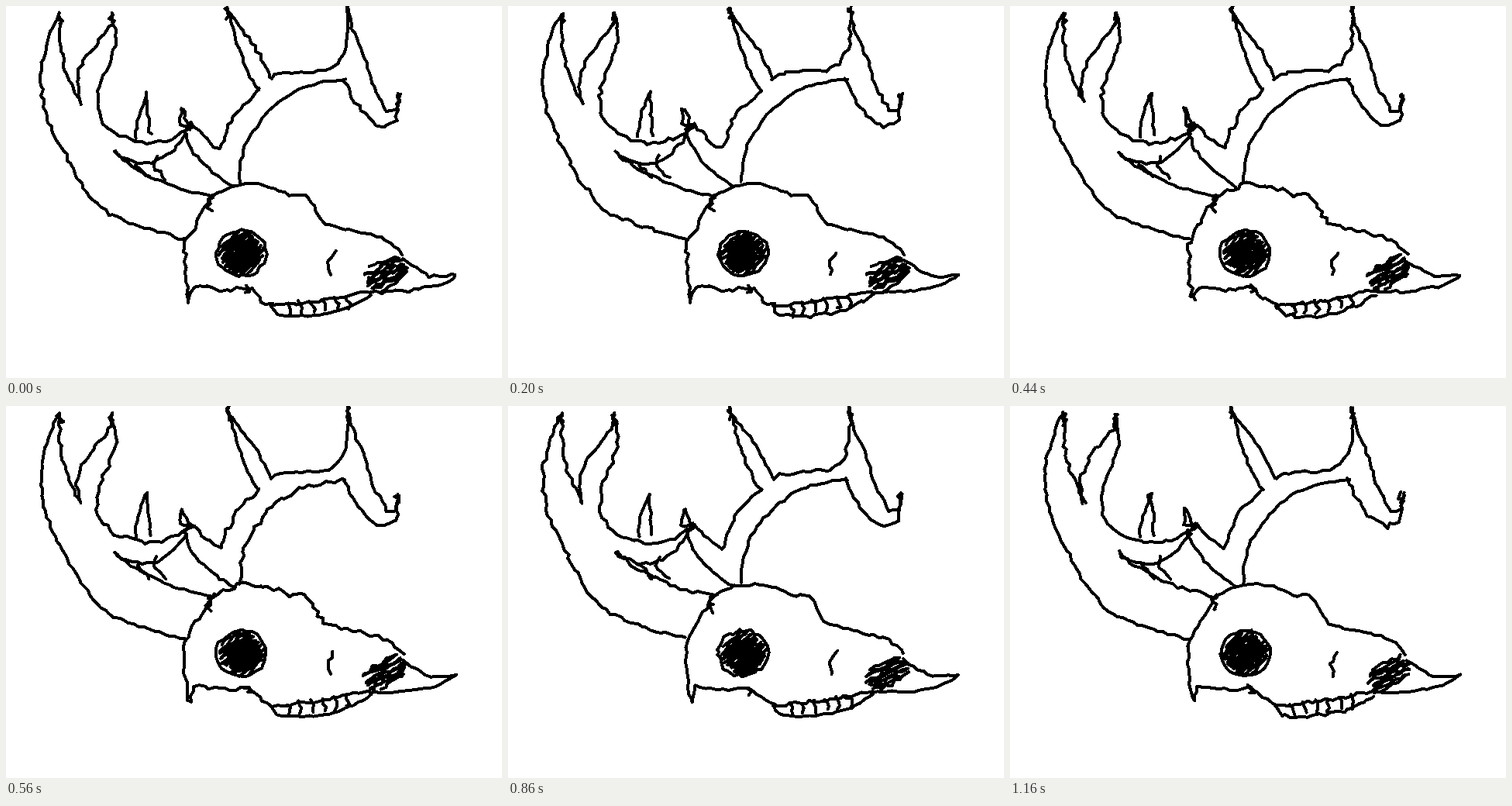
Write an HTML page that moves like this. It is 640x480 px and loops after 1180 ms.

```html
<!DOCTYPE html>
<html lang="en">
<head>
<meta charset="utf-8">
<title>Wobbling skull</title>
<style>
  html, body { margin: 0; height: 100%; overflow: hidden; background: #fff; }
  svg { display: block; width: 100%; height: 100%; }
  path { fill: none; stroke: #000; stroke-width: 4; stroke-linecap: round;
         stroke-linejoin: round; shape-rendering: crispEdges; }
</style>
</head>
<body>
<svg viewBox="0 0 640 480"></svg>
<script>
const LOOP = 1180, STEP = 20, SPACING = 7;

const range = (count, make) => Array.from({ length: count }, (_, i) => make(i));

// Zigzag filling a rounded patch, its chords lying along the given angle.
function scribble(cx, cy, length, width, degrees, count) {
  const angle = degrees * Math.PI / 180, cos = Math.cos(angle), sin = Math.sin(angle);
  return 'M' + range(count, i => {
    const across = (i + 0.5) / count * 2 - 1;
    const u = length * Math.sqrt(1 - across ** 4) * (i % 2 ? 1 : -1);
    const v = width * across;
    return [cx + u * cos - v * sin, cy + u * sin + v * cos];
  }).join('L');
}

const tip = (x, y) => `M${x} ${y}l-3 6 5 2 -3 6`;
const tooth = i => `M${363 + 15 * i} ${384 - 2 * i}l5 7 -2 8`;

const groups = [
  { // left antler and eye
    cuts: [120, 420, 620, 920], rough: 2, lines: [
      'M69 10Q46 50 45 94C46 140 65 175 75 188Q99 243 134 269Q180 289 231 301',
      'M70 11Q64 75 97 125',
      'M95 124Q84 88 110 58L136 26V10',
      'M136 10L142 40Q139 66 128 84Q117 106 119 138Q124 160 160 172Q206 186 238 154',
      'M233 164Q213 194 190 202Q158 207 140 188',
      'M140 189Q182 228 264 246',
      tip(70, 10), tip(137, 10),
      'M272 319a32 29 0 1 1 64 0a32 29 0 1 1 -64 0',
      scribble(304, 319, 28, 26, -45, 19),
      scribble(306, 321, 22, 21, -30, 15)
    ]
  },
  { // right antler and nostril
    cuts: [120, 420, 760, 960], rough: 2, lines: [
      'M240 152Q254 170 277 185L283 165L296 136L326 108',
      'M326 108Q306 84 286 3',
      'M284 5L322 54L342 93',
      'M342 93L350 87L413 84Q441 72 441 30V0',
      'M441 3L446 28L464 68L474 104L492 136L504 134L508 114',
      'M507 114L504 148L486 156Q456 146 436 94',
      'M439 95Q362 98 326 152Q300 180 302 228',
      'M424 317L414 333L418 347',
      tip(287, 2), tip(442, 2), tip(506, 113)
    ]
  },
  { // skull and muzzle
    cuts: [240, 440, 760, 960], rough: 2.4, lines: [
      'M268 245Q312 215 367 245L388 243L410 281L464 294Q496 298 511 320',
      'M267 244L232 300Q226 340 237 383L242 361L290 367L308 362L343 387',
      'M267 244l-8 6 7 4 -6 6 5 5',
      'M308 362l8 5 -5 4',
      scribble(489, 345, 29, 17, -28, 11)
    ]
  },
  { // small prongs, teeth and jaw tip
    every: 80, rough: 2, lines: [
      'M168 169Q166 150 182 111L186 167',
      'M237 158L226 129L225 156L240 151L230 162L243 156',
      'M229 160Q238 200 292 233',
      'M195 194L190 207L207 223',
      'M167 204L185 221',
      'M343 387Q410 382 468 367',
      'M342 387L350 398Q424 408 472 372',
      ...range(6, tooth),
      'M512 328Q530 342 550 350L582 347L556 362L520 368L470 370'
    ]
  }
];

function seededRandom(seed) {
  let s = seed * 2654435761 >>> 0;
  return () => {
    s = s + 0x6D2B79F5 >>> 0;
    let n = Math.imul(s ^ s >>> 15, 1 | s);
    n ^= n + Math.imul(n ^ n >>> 7, 61 | n);
    return ((n ^ n >>> 14) >>> 0) / 4294967296;
  };
}

// Joins shaken points by straight pieces; some poses are shakier than others.
function shakyPath(points, rough, seed) {
  const random = seededRandom(seed);
  const reach = rough * (0.5 + random());
  const shake = v => (v + (random() * 2 - 1) * reach).toFixed(1);
  return 'M' + points.map(({ x, y }) => [shake(x), shake(y)]).join('L');
}

const svg = document.querySelector('svg');
const strokes = groups.flatMap(({ cuts, every, rough, lines }) => lines.map((line, i) => {
  const path = document.createElementNS('http://www.w3.org/2000/svg', 'path');
  svg.append(path);
  path.setAttribute('d', line);
  const length = path.getTotalLength(), pieces = Math.ceil(length / SPACING);
  const points = range(pieces + 1, k => path.getPointAtLength(length * k / pieces));
  const delay = i % 4 * STEP;
  const poseAt = t => every
    ? Math.floor((t + delay) / every)
    : cuts.filter(cut => cut + delay <= t).length;
  return { path, points, rough, poseAt, pose: -1 };
}));

function draw(time) {
  const t = Math.floor(time % LOOP / STEP) * STEP;
  strokes.forEach((stroke, i) => {
    const pose = stroke.poseAt(t);
    if (pose === stroke.pose) return;
    stroke.pose = pose;
    stroke.path.setAttribute('d', shakyPath(stroke.points, stroke.rough, i * 100 + pose + 1));
  });
}

const start = performance.now();
function tick() {
  draw(performance.now() - start);
  requestAnimationFrame(tick);
}
tick();
</script>
</body>
</html>
```
